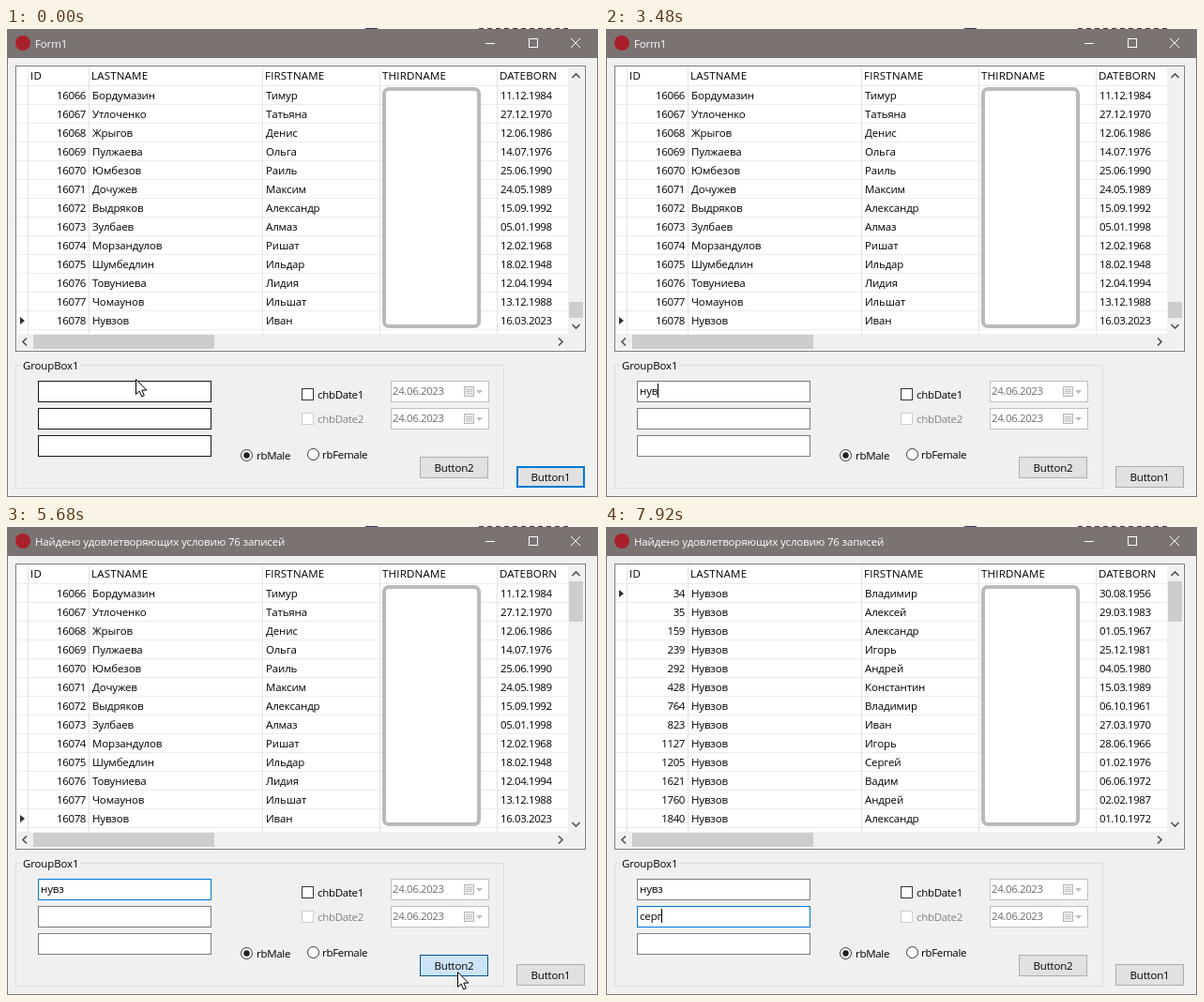
An HTML page with a canvas for the animation above (8000 ms loop, 632 px wide and 501 px high).

```html
<!DOCTYPE html>
<html lang="ru">
<head>
<meta charset="utf-8">
<style>
html, body { margin: 0; height: 100%; overflow: hidden; background: #f0f0f0; }
canvas { display: block; }
</style>
</head>
<body>
<canvas id="stage" width="632" height="501"></canvas>
<script>
const ctx = document.getElementById('stage').getContext('2d');
const LOOP = 8000, STEP = 40;
const BLUE = '#0078d7', GRAY = '#7a7a7a', BLACK = '#171717', FACE = '#f0f0f0', TITLE = '#7b7372';

const allRows = `16066 Бордумазин Тимур 11.12.1984
16067 Утлоченко Татьяна 27.12.1970
16068 Жрыгов Денис 12.06.1986
16069 Пулжаева Ольга 14.07.1976
16070 Юмбезов Раиль 25.06.1990
16071 Дочужев Максим 24.05.1989
16072 Выдряков Александр 15.09.1992
16073 Зулбаев Алмаз 05.01.1998
16074 Морзандулов Ришат 12.02.1968
16075 Шумбедлин Ильдар 18.02.1948
16076 Товуниева Лидия 12.04.1994
16077 Чомаунов Ильшат 13.12.1988
16078 Нувзов Иван 16.03.2023`.split('\n').map(r => r.split(' '));

const foundRows = `34 Владимир 30.08.1956
35 Алексей 29.03.1983
159 Александр 01.05.1967
239 Игорь 25.12.1981
292 Андрей 04.05.1980
428 Константин 15.03.1989
764 Владимир 06.10.1961
823 Иван 27.03.1970
1127 Игорь 28.06.1966
1205 Сергей 01.02.1976
1621 Вадим 06.06.1972
1760 Андрей 02.02.1987
1840 Александр 01.10.1972`.split('\n').map(r => {
  const [id, name, born] = r.split(' ');
  return [id, 'Нувзов', name, born];
});

// Pointer tracks: [time, x, y]; the pointer is hidden between them.
const tracks = [
  [[0, 138, 374], [120, 133, 377], [400, 110, 385], [1480, 110, 385]],
  [[4480, 112, 380], [4560, 170, 364], [4680, 269, 442], [4840, 400, 478],
   [5040, 487, 485], [5160, 487, 485], [5320, 481, 475], [6080, 481, 475],
   [6280, 420, 466], [6520, 260, 440], [6720, 183, 419], [7400, 183, 419]]
];

// Typed text per field: [time, content]
const typing = [
  [[0, ''], [1480, 'y'], [1560, 'ye'], [1680, 'yed'], [1760, 'yedp'],
   [3320, 'н'], [3400, 'ну'], [3480, 'нув'], [3680, 'нувз']],
  [[0, ''], [7400, 'с'], [7600, 'се'], [7760, 'сер'], [7920, 'серг']]
];

const within = (t, a, b) => t >= a && t < b;

function pointerAt(t) {
  const track = tracks.find(k => within(t, k[0][0], k[k.length - 1][0]));
  if (!track) return null;
  const i = track.findIndex(k => k[0] > t);
  const [t0, x0, y0] = track[i - 1], [t1, x1, y1] = track[i];
  const u = (t - t0) / (t1 - t0);
  return { x: Math.round(x0 + (x1 - x0) * u), y: Math.round(y0 + (y1 - y0) * u) };
}

function fill(x, y, w, h, color) {
  ctx.fillStyle = color;
  ctx.fillRect(x, y, w, h);
}

function box(x, y, w, h, face, edge, line = 1) {
  fill(x, y, w, h, edge);
  fill(x + line, y + line, w - 2 * line, h - 2 * line, face);
}

function text(s, x, y, { color = '#000', gap = -0.15, align = 'left' } = {}) {
  ctx.font = '11.5px "Open Sans", sans-serif';
  ctx.letterSpacing = gap + 'px';
  ctx.textAlign = align;
  ctx.fillStyle = color;
  ctx.fillText(s, x, y);
  return ctx.measureText(s).width;
}

function path(points, { face, edge, width = 1 }) {
  ctx.beginPath();
  points.forEach(([x, y]) => ctx.lineTo(x, y));
  if (face) {
    ctx.closePath();
    ctx.fillStyle = face;
    ctx.fill();
  }
  if (edge) {
    ctx.strokeStyle = edge;
    ctx.lineWidth = width;
    ctx.stroke();
  }
}

function disc(x, y, r, face, edge) {
  ctx.beginPath();
  ctx.arc(x, y, r, 0, 7);
  ctx.fillStyle = face;
  ctx.fill();
  if (edge) {
    ctx.strokeStyle = edge;
    ctx.lineWidth = 1;
    ctx.stroke();
  }
}

function chevron(x, y, dx, dy) {
  const tip = [x + dx * 2, y + dy * 2];
  const side = s => [x - dx * 2 + dy * 4 * s, y - dy * 2 + dx * 4 * s];
  path([side(-1), tip, side(1)], { edge: '#505050', width: 1.6 });
}

function drawWindow(title) {
  fill(0, 0, 632, 501, '#fff');
  fill(383, 0, 13, 1, '#3a3a6a');
  for (let x = 504; x < 602; x += 9) fill(x, 0, 5, 1, '#5a3050');
  box(1, 1, 630, 499, FACE, TITLE);
  fill(1, 1, 630, 31, TITLE);
  disc(18, 16, 8, '#a9202b');
  text(title, 31, 21, { color: '#fff' });
  fill(511, 16, 10, 1, '#fff');
  box(557, 11, 10, 10, TITLE, '#fff');
  path([[602, 11], [612, 21]], { edge: '#fff' });
  path([[612, 11], [602, 21]], { edge: '#fff' });
}

function drawGrid(found) {
  box(10, 40, 608, 305, '#fff', GRAY);
  for (let y = 61; y < 326; y += 20) fill(12, y, 587, 1, '#ececec');
  for (const x of [23, 88, 273, 398, 523]) fill(x, 42, 1, 284, '#e2e2e2');
  const heads = { ID: 26, LASTNAME: 91, FIRSTNAME: 276, THIRDNAME: 401, DATEBORN: 526 };
  for (const name in heads) text(name, heads[name], 55, { gap: 0.2 });

  (found ? foundRows : allRows).forEach(([id, last, first, born], i) => {
    const y = 76 + i * 20;
    text(id, 85, y, { gap: -0.4, align: 'right' });
    text(last, 92, y);
    text(first, 277, y);
    text(born, 527, y, { gap: -0.4 });
  });
  const mark = found ? 72 : 312;
  path([[15, mark - 4], [20, mark], [15, mark + 4]], { face: '#303030' });

  ctx.beginPath();
  ctx.roundRect(403, 65, 101, 253, 5);
  ctx.fillStyle = '#fff';
  ctx.fill();
  ctx.strokeStyle = '#bababa';
  ctx.lineWidth = 4;
  ctx.stroke();
}

function drawScrollbars(atTop) {
  fill(599, 42, 17, 301, FACE);
  fill(12, 326, 604, 17, FACE);
  fill(600, atTop ? 59 : 292, 15, atTop ? 43 : 17, '#cdcdcd');
  fill(29, 327, 193, 15, '#cdcdcd');
  chevron(607.5, 51, 0, -1);
  chevron(607.5, 318, 0, 1);
  chevron(20, 334.5, -1, 0);
  chevron(591, 334.5, 1, 0);
}

function drawDate(y) {
  box(410, y, 105, 23, '#fff', '#bfbfbf');
  text('24.06.2023', 412, y + 15, { color: '#6d6d6d', gap: -0.4 });
  box(488, y + 6, 11, 11, '#ececec', '#b8b8b8');
  for (let i = 0; i < 3; i++) fill(490, y + 9 + i * 2, 7, 1, '#c4c4c4');
  path([[501, y + 10], [508, y + 10], [504.5, y + 14]], { face: '#bfbfbf' });
}

function drawButton(label, x, y, face, edge, line) {
  box(x, y, 73, 23, face, edge, line);
  text(label, x + 36.5, y + 16, { gap: -0.2, align: 'center' });
}

function drawField(y, edge, s = '', caret, selected) {
  box(34, y, 185, 23, '#fff', edge);
  if (selected) fill(37, y + 3, 25, 15, BLUE);
  const w = text(s, 37, y + 15, { color: selected ? '#fff' : '#000' });
  if (caret) fill(Math.round(37 + w), y + 3, 1, 15, '#000');
}

function drawForm(t, pointer) {
  ctx.strokeStyle = '#dcdcdc';
  ctx.lineWidth = 1;
  ctx.strokeRect(10.5, 359.5, 520, 131);
  fill(16, 358, 63, 3, FACE);
  text('GroupBox1', 18, 364);

  const typed = typing.map(list => list.filter(k => k[0] <= t).pop()[1]);
  const caret1 = within(t, 440, 2240) || within(t, 2600, 2840) || within(t, 3320, 4200);
  const edge1 = t < 520 ? BLACK : within(t, 4480, 5760) ? BLUE : GRAY;
  const edge2 = t < 240 || within(t, 6680, 6960) ? BLACK : t >= 6960 ? BLUE : GRAY;
  drawField(376, edge1, typed[0], caret1, within(t, 2840, 3320));
  drawField(405, edge2, typed[1], t >= 6760);
  drawField(434, t < 160 ? BLACK : GRAY);

  box(315, 384, 13, 13, '#fff', '#333');
  text('chbDate1', 332, 395, { gap: -0.3 });
  box(315, 410, 13, 13, '#fff', '#cccccc');
  text('chbDate2', 332, 421, { gap: -0.3, color: '#838383' });
  drawDate(376);
  drawDate(405);

  disc(256.5, 455.5, 6, '#fff', '#333');
  disc(256.5, 455.5, 3.2, '#222');
  text('rbMale', 267, 460, { gap: -0.3 });
  disc(327.5, 454.5, 6, '#fff', '#333');
  text('rbFemale', 337, 459, { gap: -0.3 });

  const over = pointer && within(pointer.x, 441, 514) && within(pointer.y, 457, 480);
  const pressed = within(t, 5480, 5800), focused = within(t, 5480, 6760);
  const face = pressed ? '#cce4f7' : over ? '#e5f1fb' : '#e1e1e1';
  drawButton('Button2', 441, 457, face, pressed ? '#005499' : over || focused ? BLUE : '#adadad',
    focused && !over ? 2 : 1);
  const first = t < 440;
  drawButton('Button1', 544, 467, '#e1e1e1', first ? BLUE : '#adadad', first ? 2 : 1);
}

function drawPointer(t, { x, y }) {
  if (within(t, 440, 560) || within(t, 5480, 5640) || within(t, 6760, 6920))
    disc(x - 1, y, 12, 'rgba(255,242,60,.8)');
  const inField = within(x, 34, 219) && [376, 405, 434].some(top => within(y, top, top + 23));
  if (inField) {
    fill(x, y - 7, 1, 15, '#000');
    for (const dy of [-8, 8]) {
      fill(x - 3, y + dy, 3, 1, '#000');
      fill(x + 1, y + dy, 3, 1, '#000');
    }
    return;
  }
  const shape = [[0, 0], [0, 16], [3.7, 12.6], [6.2, 18.4], [8.8, 17.3], [6.3, 11.6], [11.3, 11.6]];
  path(shape.map(([dx, dy]) => [x + dx + 0.5, y + dy + 0.5]), { face: '#fff', edge: '#000' });
}

function frame(now) {
  const t = Math.floor((now % LOOP) / STEP) * STEP;
  const pointer = pointerAt(t);
  drawWindow(t < 5600 ? 'Form1' : 'Найдено удовлетворяющих условию 76 записей');
  drawGrid(t >= 5760);
  drawScrollbars(t >= 5600);
  drawForm(t, pointer);
  if (pointer) drawPointer(t, pointer);
  requestAnimationFrame(frame);
}
requestAnimationFrame(frame);
</script>
</body>
</html>
```
